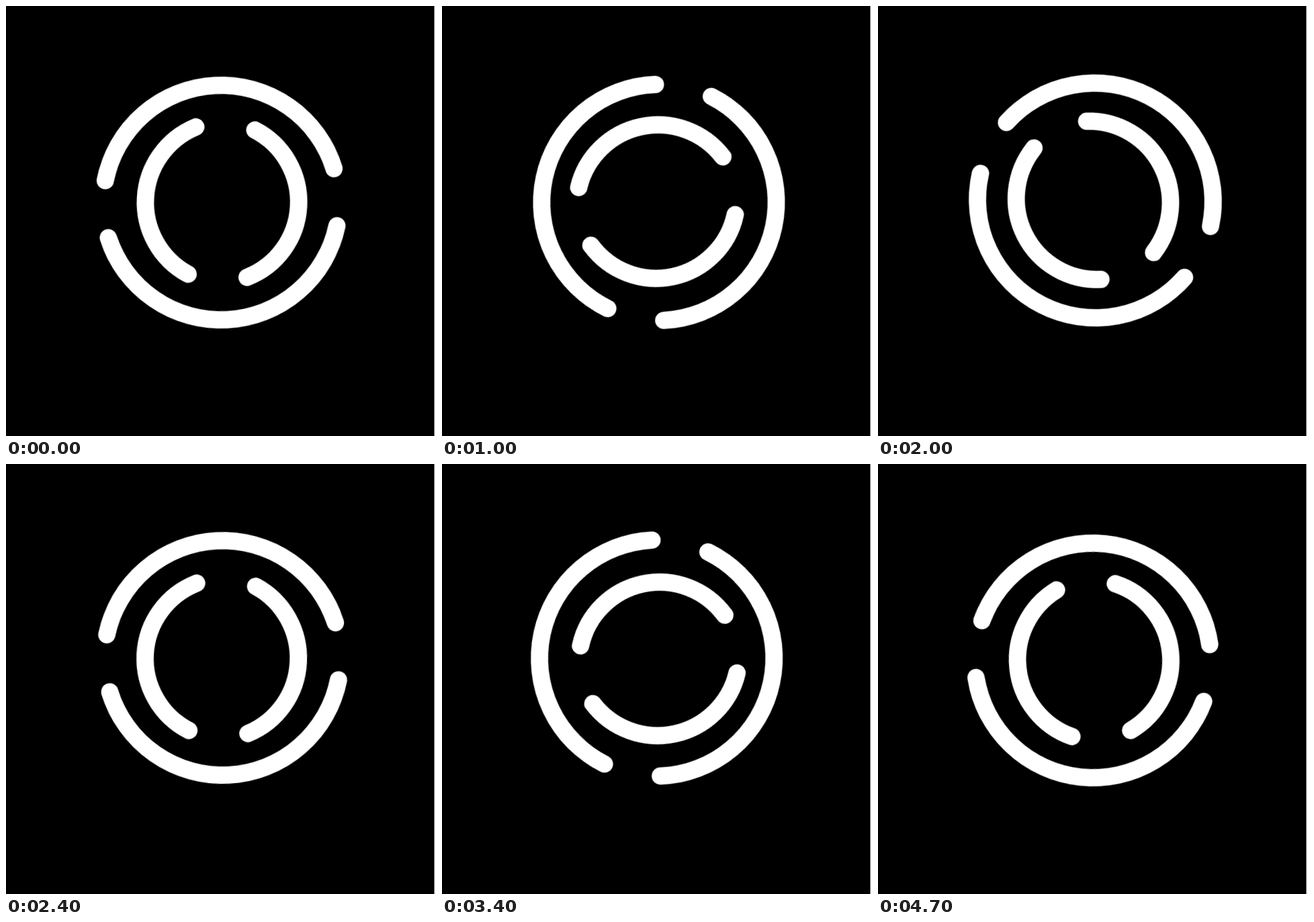
Animation of 640 by 640 pixels, one loop 4800 ms. Source, as an HTML page:

```html
<!DOCTYPE html>
<html lang="en">
<head>
<meta charset="utf-8">
<title>Counter-rotating rings</title>
<style>
  html, body { margin: 0; width: 100%; height: 100%; overflow: hidden; background: #fff; }
  svg { display: block; width: 100vw; height: 100vh; }
  path { fill: none; stroke: #fff; stroke-width: 25.8; stroke-linecap: round; }

  /* Alternating 6 and 9 degree steps: 15 degrees per 200 ms, plus 6 halfway.
     The 1 ms lead keeps samples off the step boundaries. */
  .spin { animation: spin 4.8s steps(24) -1ms infinite; }
  .tick { animation: tick 200ms step-end -1ms infinite; }
  .back { --dir: -1; }
  .forth { --dir: 1; }
  @keyframes spin {
    from { transform: rotate(0deg); }
    to { transform: rotate(calc(var(--dir) * 360deg)); }
  }
  @keyframes tick {
    0% { transform: rotate(0deg); }
    50%, 100% { transform: rotate(calc(var(--dir) * 6deg)); }
  }
</style>
</head>
<body>
<svg viewBox="0 0 640 640">
  <rect width="637.5" height="640"/>
  <g transform="translate(321.3 290.6)">
    <g class="spin back"><g class="tick">
      <g transform="translate(-1.1 2.9) rotate(87)">
        <path d="M42.6-170.4A176.3 176.3 0 0 1 42.6 170.4"/>
        <path d="M-42.6 170.4A175.7 175.7 0 0 1-42.6-170.4"/>
      </g>
    </g></g>
    <g class="spin forth"><g class="tick">
      <g transform="translate(-.6 1.3) rotate(3)">
        <path d="M44-109.7A120.3 120.3 0 0 1 44 109.7"/>
        <path d="M-44 109.7A121.5 121.5 0 0 1-44-109.7"/>
      </g>
    </g></g>
  </g>
</svg>
</body>
</html>
```
